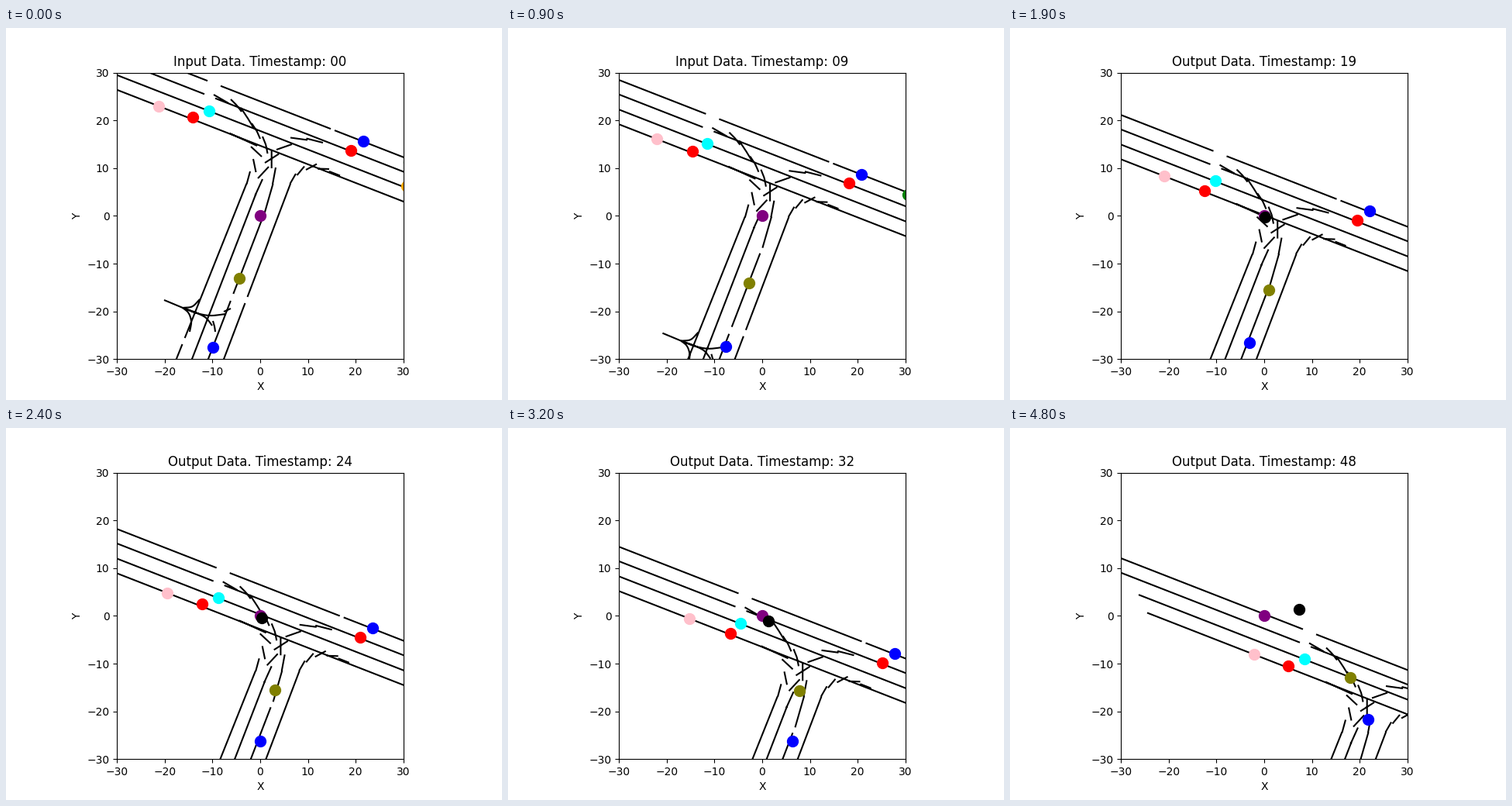
Recreate the animation shown at these times as a matplotlib script. Size 640 by 480 pixels, loop 4900 ms.

```python
import numpy as np
import matplotlib.pyplot as plt
from matplotlib.animation import FuncAnimation

FRAMES = 49
SWITCH = 19            # first step of the output phase
SCALE = 6.16           # pixels per metre
CENTER = np.array([328, 242.4])
KEYS = np.array([0, 9, 19, 24, 32, 40, 48])


def metres(px):
    """Stage pixels to axis units."""
    return (np.asarray(px, float) - CENTER) / SCALE * [1, -1]


def spline(keys, points):
    """Smooth path through points, sampled once per step."""
    points = np.array(points, float)
    slope = np.gradient(points, keys, axis=0, edge_order=2)
    t = np.arange(FRAMES)
    i = np.clip(np.searchsorted(keys, t, side="right") - 1, 0, len(keys) - 2)
    h = (keys[i + 1] - keys[i])[:, None]
    u = (t - keys[i])[:, None] / h
    return ((1 + 2 * u) * (1 - u) ** 2 * points[i] + u * (1 - u) ** 2 * h * slope[i]
            + u * u * (3 - 2 * u) * points[i + 1] + u * u * (u - 1) * h * slope[i + 1])


def curve(*pts):
    """Rounded polyline through a few points."""
    p = np.array(pts, float)
    s = np.r_[0, np.cumsum(np.hypot(*np.diff(p, axis=0).T))]
    m = np.gradient(p, s, axis=0)
    out = []
    for k in range(len(p) - 1):
        u = np.linspace(0, 1, 8)[:, None]
        h = s[k + 1] - s[k]
        out.append((1 + 2 * u) * (1 - u) ** 2 * p[k] + u * (1 - u) ** 2 * h * m[k]
                   + u * u * (3 - 2 * u) * p[k + 1] + u * u * (u - 1) * h * m[k + 1])
    return np.vstack(out)


def main_lane(y, *spans):
    """Pieces of a main-road lane; y is its height at x = 143."""
    return [[(x, y + 0.39 * (x - 143)) for x in span] for span in spans]


def side_lane(x, slope, *spans):
    """Pieces of a side-road lane; x is its position at y = 201."""
    return [[(x - slope * (y - 201), y) for y in span] for span in spans]


lanes = (
    main_lane(79.7, (59, 560))
    + main_lane(60.7, (48, 560))
    + main_lane(41.2, (0, 256), (270, 560))
    + main_lane(22.5, (0, 260), (277, 419), (424, 560))
    + side_lane(310.3, 0.4, (201, 400), (408, 480))
    + side_lane(327.5, 0.387, (214, 480))
    + side_lane(348, 0.385, (241, 241), (248, 343), (352, 480))
    + side_lane(367, 0.38, (201, 347), (355, 480))
)

links = [
    (344.5, 201, 333, 241),
    (289, 136, 324, 152), (375.5, 190, 385, 178.5), (387, 183, 401, 175.5),
    (402, 181.5, 417, 182), (417, 185, 431, 190.5), (349, 157, 369, 150),
    (367, 141.5, 389, 144.5), (387.5, 142.5, 409, 148), (342.7, 158, 342.7, 181),
    (334, 174, 352, 162.5), (325, 194, 339, 179), (316, 153, 330, 166),
    (319, 169, 322.5, 186), (310.5, 201.5, 315, 185), (321.5, 216, 331, 195),
    (344, 201.5, 348, 180), (366.5, 201, 374, 188), (268, 86, 287, 97),
]

bends = [
    curve((290, 92), (297, 99), (304, 108)),
    curve((303, 103), (311, 115), (319, 128)),
    curve((317, 123), (323, 132), (328, 143)),
    curve((331, 140), (335, 150), (337.5, 162)),
    curve((204, 351), (228, 361), (247, 368), (258, 374), (266, 384)),
    curve((228, 361), (243, 367), (262, 371), (284, 369)),
    curve((228, 361), (240, 359.5), (250, 350)),
    curve((228, 361), (235, 367), (239, 378), (237, 392)),
    curve((267, 378), (269, 385), (270, 392)),
    curve((281, 366), (290, 362)),
]

pieces = lanes + [np.reshape(s, (2, 2)) for s in links] + bends
road = np.vstack([np.vstack([metres(p), [[np.nan, np.nan]]]) for p in pieces])

# The ego vehicle stays at the centre, so the world slides past it.
drift = spline(KEYS, [(0, 0), (-4.6, 42.7), (2.5, 90.6), (11.7, 112.3),
                      (37.5, 145.3), (74.3, 170.5), (118, 191.5)])
steps = np.arange(FRAMES)
wobble = np.interp(steps, KEYS, [0, 1.5, 7.3, 0, 8, 7, 0])


def parked(x, y):
    return drift + [x, y]


tracks = [
    ("pink", parked(196.5, 100.7)),
    ("red", parked(241, 115) + wobble[:, None] * [1, 0.6]),
    ("cyan", parked(262, 106.5)),
    ("red", parked(445, 157.7)),
    ("blue", parked(461, 145.8)),
    ("green", parked(520.3, 172.7)),
    ("orange", parked(516.8, 204) + steps[:, None] * [3, 1.17]),
    ("olive", spline(KEYS, [(301, 323), (311, 329), (334, 338.3), (347, 338.3),
                            (376, 338.6), (407, 329), (439, 322)])),
    ("blue", spline(KEYS, [(267, 412), (281, 411), (309, 406.3), (328, 403.5),
                           (367, 403.5), (414, 391), (462, 376.3)])),
    ("purple", np.tile(CENTER, (FRAMES, 1))),
    ("black", spline(KEYS[2:], [(328.8, 243.7), (329.5, 245), (336, 249.3),
                                (347, 242.4), (373, 233.5)])),
]
tracks = [(color, metres(path)) for color, path in tracks]

fig, ax = plt.subplots(figsize=(6.4, 4.8), dpi=100)
ax.set_aspect("equal")
ax.set(xlim=(-30, 30), ylim=(-30, 30), xlabel="X", ylabel="Y")
ticks = range(-30, 31, 10)
ax.set_xticks(ticks)
ax.set_yticks(ticks)
title = ax.set_title("")
road_line, = ax.plot([], [], "k-", lw=1.5, solid_capstyle="butt")
dots = [ax.plot([], [], "o", color=color, ms=10)[0] for color, _ in tracks]


def draw(i):
    phase = "Output" if i >= SWITCH else "Input"
    title.set_text(f"{phase} Data. Timestamp: {i:02d}")
    shift = drift[i] / SCALE * [1, -1]
    road_line.set_data(*(road + shift).T)
    for dot, (_, path) in zip(dots, tracks):
        dot.set_data(path[i, :1], path[i, 1:])
    dots[-1].set_visible(i >= SWITCH)
    return [title, road_line, *dots]


anim = FuncAnimation(fig, draw, frames=FRAMES, interval=100, repeat=True,
                     repeat_delay=0, blit=False)
plt.show()
```
